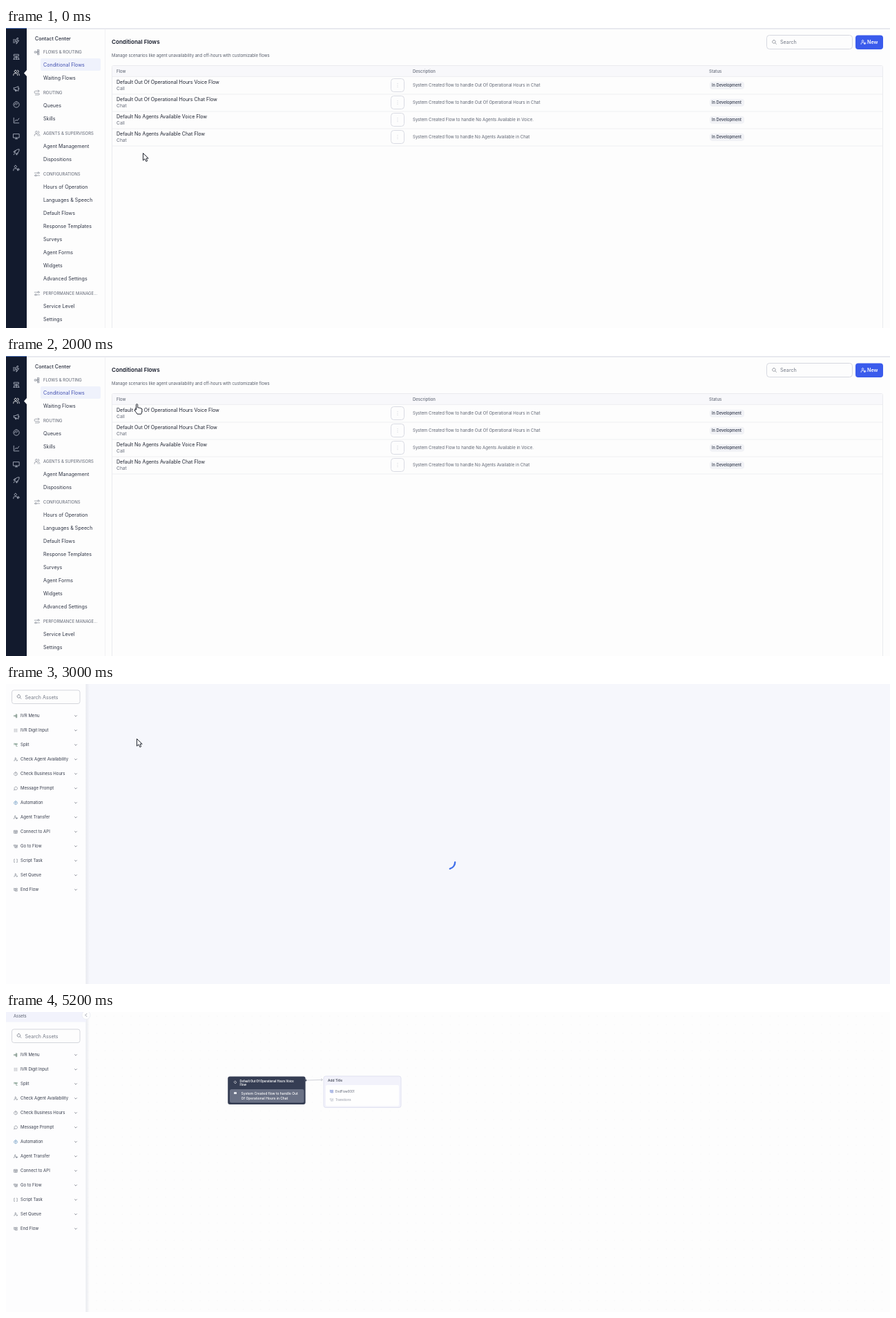
Write an HTML page that moves like this. It is 1280 px wide and 435 px high and loops after 5.4 s.

```html
<!DOCTYPE html>
<html lang="en">
<head>
<meta charset="utf-8">
<title>Conditional flows</title>
<style>
  html, body { margin: 0; width: 100%; height: 100%; overflow: hidden; background: #fdfdfd; }
  svg { display: block; width: 100%; height: 100%; }
  text { font-family: Inter, "Open Sans", sans-serif; white-space: pre; }
</style>
</head>
<body>
<svg id="stage" viewBox="0 0 1280 435"></svg>
<script>
const LOOP = 5400, STEP = 200;

// Line icons on a 24-unit grid
const ICONS = {
  zap: 'M14 2L8 13h6l-2 9 9-12h-6l3-8zM1 7h7M1 12h4M1 17h7',
  org: 'M4 3h16v6H4zM12 9v5M4 20v-6h16v6M2 20h5M10 20h5M17 20h5M12 14v6',
  users: 'M2 21v-3a4 4 0 0 1 4-4h6a4 4 0 0 1 4 4v3M9 3a4 4 0 1 0 .1 0M16 3a4 4 0 0 1 0 8M22 21v-3a4 4 0 0 0-3-4',
  horn: 'M3 9v6h4l12 5V4L7 9zM7 15l2 6h3l-2-5M21 10v4',
  gauge: 'M12 2a10 10 0 1 0 .1 0M12 13l5-6M6 13a6 6 0 0 1 6-6',
  chart: 'M3 3v18h18M7 15l4-5 4 3 6-8',
  screen: 'M2 4h20v13H2zM8 21h8M12 17v4',
  rocket: 'M9 15l-3-3C9 5 14 2 22 2c0 8-4 13-10 16zM7 12H2l4-5h4M12 17v5l5-4v-4M3 21l3-5',
  userPlus: 'M2 21v-3a4 4 0 0 1 4-4h6a4 4 0 0 1 4 4v3M9 3a4 4 0 1 0 .1 0M19 13v8M15 17h8',
  flow: 'M8 9H2v6h6zM8 12h6M14 3v18M14 3h6v5h-6M14 10h6v5h-6M14 17h6v5h-6',
  route: 'M5 20h13a3 3 0 0 0 0-6H6a4 4 0 0 1 0-9h14M16 1l4 4-4 4',
  sliders: 'M2 7h12M20 7h2M17 4a3 3 0 1 0 .1 0M2 17h2M10 17h12M7 14a3 3 0 1 0 .1 0',
  search: 'M10 2a8 8 0 1 0 .1 0M16 16l6 6',
  keypad: 'M4 5h2M11 5h2M18 5h2M4 12h2M11 12h2M18 12h2M4 19h2M11 19h2M18 19h2',
  split: 'M2 4h9v6H2M11 7h4v13h6M15 4h6v6h-6',
  user: 'M4 21v-3a4 4 0 0 1 4-4h6M11 3a4 4 0 1 0 .1 0M16 18h6M19 15l3 3-3 3',
  clock: 'M12 2a10 10 0 1 0 .1 0M12 6v6l4 3',
  bubble: 'M3 21l2-5a9 9 0 1 1 4 4z',
  gear: 'M12 2a10 10 0 1 0 .1 0M12 8a4 4 0 1 0 .1 0',
  table: 'M3 4h18v16H3zM3 10h18M9 10v10M15 10v10',
  jump: 'M3 4h7v7H3zM14 13h7v7h-7zM14 4l7 6M21 4v6h-6M7 14v6h5',
  braces: 'M6 3H3v18h3M18 3h3v18h-3',
  end: 'M3 3v14h7M3 7h7M12 4h9v6h-9zM12 14h9v6h-9z',
  chevron: 'M5 9l7 7 7-7',
  back: 'M15 5l-7 7 7 7',
  diamond: 'M12 3l8 9-8 9-8-9z'
};

const text = (x, y, size, str, fill = '#2b3040', weight = 400) =>
  `<text x="${x}" y="${y + size * .36}" font-size="${size}" font-weight="${weight}" fill="${fill}">${str.replace('&', '&amp;')}</text>`;
const rect = (x, y, w, h, fill, rx = 0, stroke = 'none') =>
  `<rect x="${x}" y="${y}" width="${w}" height="${h}" rx="${rx}" fill="${fill}" stroke="${stroke}"/>`;
const line = (x1, y1, x2, y2, stroke) =>
  `<path d="M${x1} ${y1}L${x2} ${y2}" stroke="${stroke}" fill="none"/>`;
const icon = (name, x, y, size, stroke, width = 2) =>
  `<path transform="translate(${x - size / 2} ${y - size / 2}) scale(${size / 24})" d="${ICONS[name]}"
    fill="none" stroke="${stroke}" stroke-width="${width}" stroke-linecap="round" stroke-linejoin="round"/>`;

function sidebar() {
  const rail = ['zap', 'org', 'users', 'horn', 'gauge', 'chart', 'screen', 'rocket', 'userPlus'];
  const sections = [
    [35, 'flow', 'FLOWS & ROUTING', ['Conditional Flows', 'Waiting Flows']],
    [94, 'route', 'ROUTING', ['Queues', 'Skills']],
    [153, 'users', 'AGENTS & SUPERVISORS', ['Agent Management', 'Dispositions']],
    [212, 'sliders', 'CONFIGURATIONS', ['Hours of Operation', 'Languages & Speech', 'Default Flows',
      'Response Templates', 'Surveys', 'Agent Forms', 'Widgets', 'Advanced Settings']],
    [385, 'sliders', 'PERFORMANCE MANAGE...', ['Service Level', 'Settings']]
  ];
  return rect(0, 0, 30, 435, '#121a2d') + rect(0, 0, 30, 1, '#4c70b5') +
    rail.map((name, i) => icon(name, 15, 19 + 23 * i, 10, i === 2 ? '#fff' : '#b4bac8')).join('') +
    '<path d="M30 61L26 65.5L30 70z" fill="#fdfdfd"/>' +
    line(143.5, 2, 143.5, 435, '#f1f1f4') +
    text(42, 15.5, 7.15, 'Contact Center', '#252b3b', 500) +
    rect(50, 44, 87, 18, '#eff2fc', 2) +
    sections.map(([y, name, title, items]) =>
      icon(name, 45, y, 9, '#6e7482', 1.6) + text(54, y, 6, title, '#5d6371') +
      items.map((item, i) => text(54, y + 18 + 19 * i, 7.15, item,
        item === 'Conditional Flows' ? '#414fb0' : '#2e3444')).join('')
    ).join('');
}

function flowTable() {
  const created = 'System Created flow to handle ';
  const rows = [
    ['Default Out Of Operational Hours Voice Flow', 'Call', created + 'Out Of Operational Hours in Chat'],
    ['Default Out Of Operational Hours Chat Flow', 'Chat', created + 'Out Of Operational Hours in Chat'],
    ['Default No Agents Available Voice Flow', 'Call', 'System Created Flow to handle No Agents Available in Voice.'],
    ['Default No Agents Available Chat Flow', 'Chat', created + 'No Agents Available in Chat']
  ];
  return text(153, 20.5, 8.1, 'Conditional Flows', '#171c2b', 600) +
    text(153, 39.5, 5.98, 'Manage scenarios like agent unavailability and off-hours with customizable flows', '#555b69') +
    rect(1101.5, 10.5, 124, 20, '#fdfdfd', 4, '#d6d8e0') + icon('search', 1112.5, 20.5, 7, '#5f6573') +
    text(1121, 20.5, 7.2, 'Search', '#747a87') +
    rect(1230, 10.5, 40, 20.5, '#3a5bec', 4) + icon('userPlus', 1241.5, 20.5, 8, '#fff', 2.4) +
    text(1247, 20.5, 7.1, 'New', '#fff', 600) +
    rect(153.5, 54.5, 1116, 400, 'none', 2, '#eaebef') + rect(154, 55, 1115, 15, '#f8f8fb') +
    line(154, 70.5, 1269, 70.5, '#eeeff2') +
    text(160, 62.5, 6, 'Flow', '#6a707e', 500) + text(589, 62.5, 6, 'Description', '#6a707e', 500) +
    text(1018, 62.5, 6, 'Status', '#6a707e', 500) +
    '<g id="hover"></g>' +
    rows.map(([title, kind, about], i) => {
      const y = 83.2 + 25 * i;
      return line(154, y + 12.8, 1269, y + 12.8, '#eff0f2') +
        text(160, y - 4.3, 7.07, title, '#1d2230') + text(160, y + 4.5, 6.7, kind, '#646a78') +
        rect(557.5, Math.round(y) - 9.5, 19, 19, '#fdfdfd', 4, '#d9dbe3') +
        [-2.5, 0, 2.5].map(d => rect(566.6, y + d - .4, .8, .8, '#b9bdc8')).join('') +
        text(589, y, 6.08, about, '#5d6371') +
        rect(1019, y - 5.5, 50, 11, '#f1f2f6', 4) + text(1022, y, 5.75, 'In Development', '#30374a', 500);
    }).join('');
}

function assetPanel() {
  const assets = [
    ['flow', 'IVR Menu', '#6b8577'], ['keypad', 'IVR Digit Input'], ['split', 'Split', '#547a66'],
    ['user', 'Check Agent Availability'], ['clock', 'Check Business Hours'], ['bubble', 'Message Prompt'],
    ['gear', 'Automation', '#4b82b4'], ['userPlus', 'Agent Transfer'], ['table', 'Connect to API'],
    ['jump', 'Go to Flow'], ['braces', 'Script Task'], ['user', 'Set Queue'], ['end', 'End Flow']
  ];
  return rect(0, -20, 116, 34.5, '#f2f3fc') + text(11, 6, 5.9, 'Assets', '#5b6170') +
    rect(8.5, 25, 98.5, 19.5, '#fdfdfd', 3, '#d4d6dc') + icon('search', 19, 34.5, 7, '#4d5362') +
    text(27.5, 35, 7.1, 'Search Assets', '#747986') +
    assets.map(([name, label, tint = '#666c79'], i) => {
      const y = 62.3 + 21 * i;
      return icon(name, 14, y, 6, tint, 2.2) + text(21, y, 6.05, label, '#363c4b') +
        icon('chevron', 101, y, 5, '#4a505f', 3);
    }).join('') +
    '<circle cx="116" cy="4.5" r="6" fill="#fff" stroke="#eceef4"/>' + icon('back', 116, 4.5, 7, '#4d5362');
}

function nodes() {
  return rect(321.2, 93.4, 112.4, 40.5, '#353d53', 3) + rect(324, 112, 107.5, 19.5, '#6a7185', 2.5) +
    icon('diamond', 332, 102, 5, '#fff', 3) + rect(330, 116, 4, 3, '#e4e6ec', .6) +
    text(338.5, 100.5, 4.15, 'Default Out Of Operational Hours Voice', '#fff', 600) +
    text(338.5, 105.5, 4.15, 'Flow', '#fff', 600) +
    text(340.5, 118.5, 4.95, 'System Created flow to handle Out', '#fff', 500) +
    text(340.5, 125, 4.95, 'Of Operational Hours in Chat', '#fff', 500) +
    '<circle cx="434" cy="99" r="1.5" fill="#4a5164"/>' +
    '<path d="M436 99L458 98.3M456 96.5L458.500 98.3L456 100" fill="none" stroke="#b9bcc6" stroke-width=".7"/>' +
    rect(460, 93, 112, 45.5, '#f2f2fb', 3, '#e1e2f1') + rect(463, 106, 106, 30.5, '#fefefe', 2) +
    text(466, 99.3, 4.95, 'Add Title', '#363c4b', 500) +
    icon('end', 471.5, 115.2, 5.5, '#5670cc', 2.2) + text(477, 115.2, 4.35, 'EndFlow0001', '#5a6070') +
    icon('jump', 471.5, 127.3, 5.5, '#b3b6c1', 2) + text(477, 127.3, 4.35, 'Transitions', '#8e929f');
}

const stage = document.getElementById('stage');
stage.innerHTML = `
  <defs>
    <pattern id="dots" width="12.5" height="12.5" patternUnits="userSpaceOnUse">
      <circle cx="6" cy="6" r=".6" fill="#f3f3f5"/>
    </pattern>
    <linearGradient id="edge"><stop stop-color="#e6e8ee"/><stop offset="1" stop-color="#e6e8ee" stop-opacity="0"/></linearGradient>
  </defs>
  <g id="editor">
    ${rect(0, 0, 1280, 435, '#f6f7fc')}
    <path id="spinner" d="M-6 -8A10 10 0 0 1 6 -8" fill="none" stroke="#4170ea" stroke-width="2.4" stroke-linecap="round"/>
    <g id="board">
      ${rect(0, 0, 1280, 435, '#fdfdfd')}${rect(116, 0, 1164, 435, 'url(#dots)')}
      <g id="nodes">${nodes()}</g>
    </g>
    ${rect(115, 0, 6, 435, 'url(#edge)')}${rect(0, 0, 115.5, 435, '#fdfdfe')}
    <g id="panel">${assetPanel()}</g>
  </g>
  <g id="list">
    ${rect(0, 0, 1280, 435, '#fdfdfd')}${rect(30, 0, 1250, 2, '#e9eaef')}${sidebar()}${flowTable()}
  </g>
  <g id="cursor">
    <path id="arrow" d="M.5.5V11L3 8.7L4.9 12.5L6.7 11.7L5 8H8.2z" fill="#fff" stroke="#20242e" stroke-width="1"/>
    <path id="hand" d="M3 9V1.8Q3 .6 4 .6T5.2 1.8V6Q6.5 5.3 7.3 6.3Q8.7 5.7 9.4 6.8Q11.4 6.4 11.4 8.4V11Q11.4 13 10.2 15.2H4.6Q3.2 12.8 .7 10Q.3 8.2 3 9z" fill="#fff" stroke="#20242e" stroke-width="1"/>
    <path id="pointer" d="M.3.3L11 4.6L6.300 6.3L4.2 11z" fill="#353d52"/>
  </g>`;

const part = id => document.getElementById(id);
const show = (id, opacity) => part(id).setAttribute('opacity', opacity);
const move = (id, x, y, turn = 0) =>
  part(id).setAttribute('transform', `translate(${x} ${y}) rotate(${turn})`);

// The last entry at or before t holds
const at = (track, t) => track.filter(([start]) => start <= t).pop();

const cursorTrack = [
  [0, 'arrow', 198, 181], [1600, 'hand', 185.5, 69], [1800, 'arrow', 188.5, 47],
  [2000, 'hand', 185.5, 69], [2200, 'hand', 185, 79], [2800, 'arrow', 189, 79],
  [3600, 'pointer', 189, 79], [4400, 'pointer', 235, 152], [4600, 'pointer', 562, 334],
  [4800, 'pointer', 494, 415], [5000, '', 0, 0]
];
const hoverTrack = [
  [0, []], [1600, ['#e9ebf1', '#f4f5f6']], [1800, []], [2200, ['#ebecf0']], [2800, []]
];
const listTrack = [[0, 1], [2800, .5], [3000, 0]];
const nodesTrack = [[0, 0], [3800, .55], [4000, .92], [4200, 1]];

function draw(now) {
  const t = Math.floor(now % LOOP / STEP) * STEP;
  const loaded = t >= 3800;
  show('list', at(listTrack, t)[1]);
  show('board', loaded ? 1 : 0);
  show('nodes', at(nodesTrack, t)[1]);
  part('hover').innerHTML = at(hoverTrack, t)[1]
    .map((fill, i) => rect(154, 70.5 + 25 * i, 1115, 25.5, fill)).join('');

  const lift = t < 3200 ? -16 : 0;
  move('panel', 0, lift);
  move('spinner', 640.2, 274.2 + lift, (t - 2800) * .64);
  show('spinner', loaded ? 0 : 1);

  const [, kind, x, y] = at(cursorTrack, t);
  for (const shape of ['arrow', 'hand', 'pointer']) show(shape, shape === kind ? 1 : 0);
  move('cursor', x, y);
}

const begin = performance.now();
(function frame() {
  draw(performance.now() - begin);
  requestAnimationFrame(frame);
})();
</script>
</body>
</html>
```
